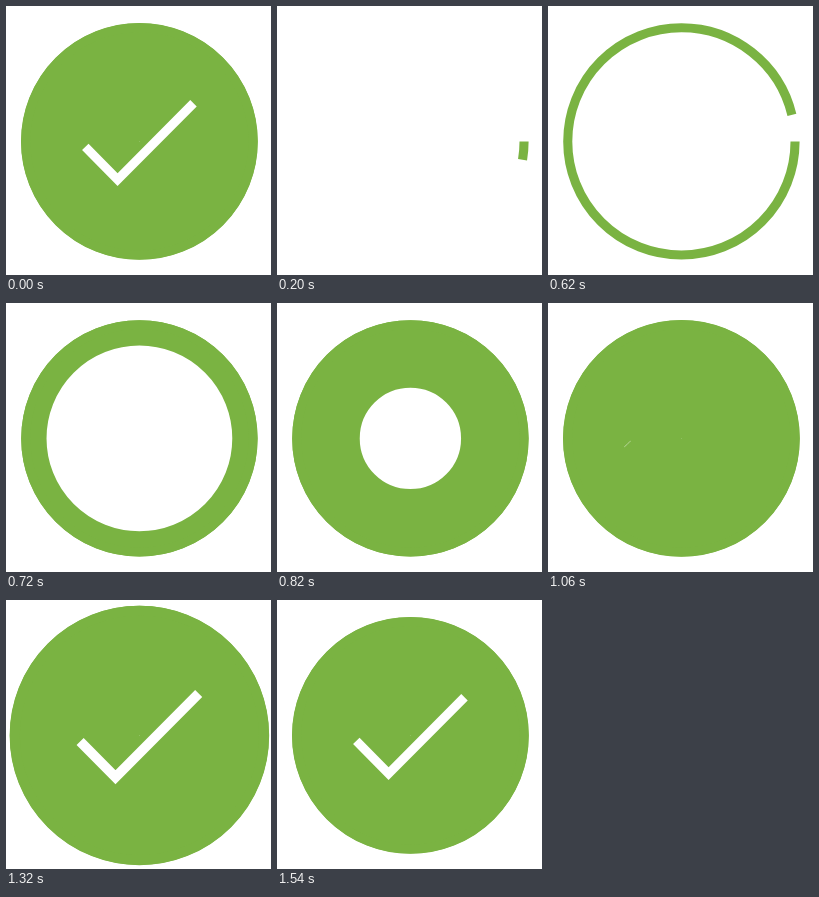
Write an HTML page that moves like this. It is 265 by 269 pixels and loops after 1880 ms.

```html
<!DOCTYPE html>
<html lang="en">
<head>
<meta charset="utf-8">
<title>Check mark</title>
<style>
  html, body { margin: 0; width: 100%; height: 100%; overflow: hidden; background: #fff; }
  svg { display: block; width: 100%; height: 100%; }
</style>
</head>
<body>
<svg viewBox="0 0 265 269" fill="none">
  <g id="badge">
    <circle id="disc" stroke="#7ab342"/>
    <circle id="ring" r="25" stroke="#7ab342" stroke-width="2"/>
    <path id="tick" d="M-11.9 1.2l7.1 7.2 16.7-16.8" stroke="#fff" stroke-width="2"/>
  </g>
</svg>
<script>
const LOOP = 1880;
const UNIT = 118.2 / 26; // the badge is drawn with a radius of 26 units
const [badge, disc, ring, tick] =
  ['badge', 'disc', 'ring', 'tick'].map(id => document.getElementById(id));

// CSS-style cubic-bezier(x1, 0, x2, 1)
function bezier(x1, x2) {
  return x => {
    if (x <= 0) return 0;
    if (x >= 1) return 1;
    let lo = 0, hi = 1, s;
    for (let i = 0; i < 30; i++) {
      s = (lo + hi) / 2;
      const at = 3 * (1 - s) * s * ((1 - s) * x1 + s * x2) + s ** 3;
      if (at < x) lo = s; else hi = s;
    }
    return s * s * (3 - 2 * s);
  };
}
const draw = bezier(0.65, 0.45);
const inOut = bezier(0.42, 0.58);
const span = (t, start, length) => Math.min(1, Math.max(0, (t - start) / length));

function stroke(el, dash, p) {
  el.setAttribute('visibility', p > 0 ? 'visible' : 'hidden');
  el.setAttribute('stroke-dasharray', dash);
  el.setAttribute('stroke-dashoffset', dash * (1 - p));
}

function render(now) {
  let t = now % LOOP;
  if (t < 20) t = LOOP; // the finished badge flashes before restarting

  stroke(ring, 166, draw(span(t, 88, 700)));
  stroke(tick, 48, draw(span(t, 1046, 360)));

  // The disc closes inwards in whole steps of 1/28 of its radius
  const steps = Math.min(28, Math.floor(30 * inOut(span(t, 567, 480))));
  const width = steps * 26 / 28;
  disc.setAttribute('r', 26 - width / 2);
  disc.setAttribute('stroke-width', steps === 28 ? 26.1 : width);

  const pulse = inOut(1 - Math.abs(2 * span(t, 1167, 360) - 1));
  badge.setAttribute('transform',
    `translate(133.4 135.4) scale(${UNIT * (1 + 0.1 * pulse)})`);
}

function tickLoop() {
  render(performance.now());
  requestAnimationFrame(tickLoop);
}
tickLoop();
</script>
</body>
</html>
```
